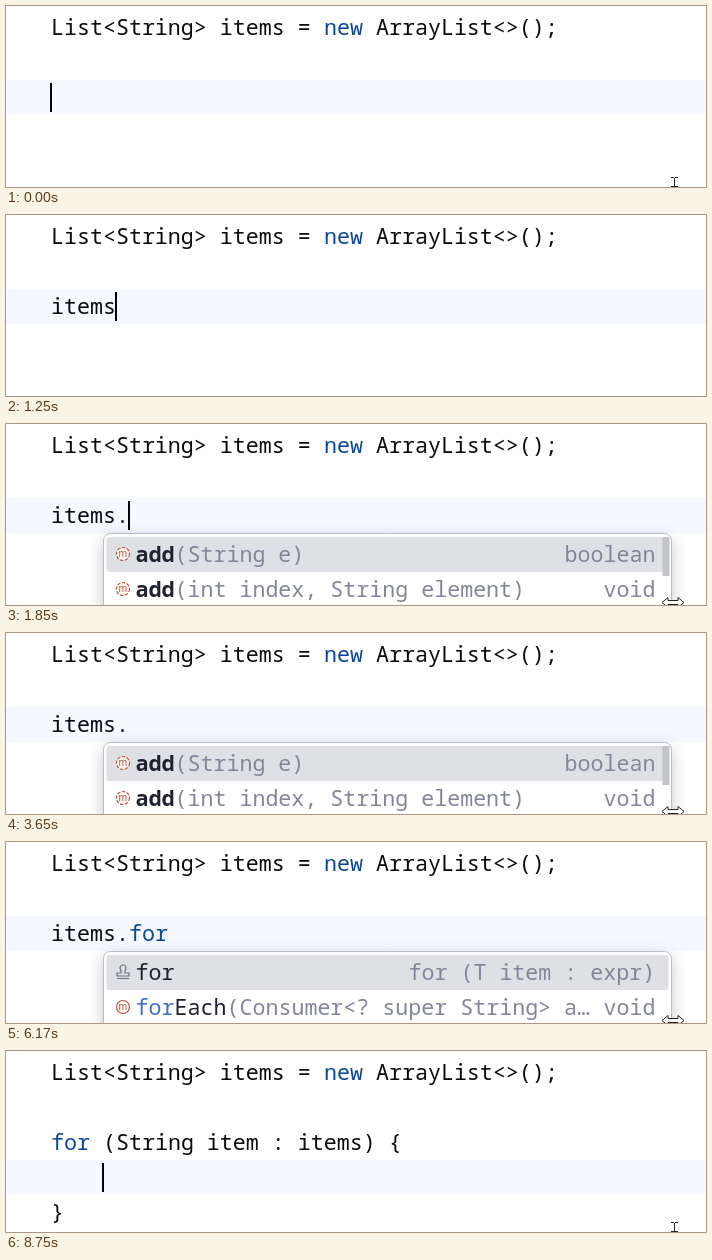
An HTML page with a canvas for the animation above (9080 ms loop, 700 by 181 pixels).

```html
<!DOCTYPE html>
<html lang="en">
<head>
<meta charset="utf-8">
<title>Code completion</title>
<style>
  html, body { margin: 0; width: 100%; height: 100%; overflow: hidden; background: #fff; }
  canvas { display: block; }
</style>
</head>
<body>
<canvas id="stage" width="700" height="181"></canvas>
<script>
const ctx = document.getElementById('stage').getContext('2d');
const LOOP = 9080, LEFT = 45, CHAR = 13, LINE = 35;
const INK = '#0b0b0d', KEYWORD = '#0b4796', DARK = '#1f2030', GREY = '#83869a', PREFIX = '#3c70cc';
const RED = '#b2573f', BROWN = '#9a6656';

const ink = text => [text, INK];
const keyword = text => [text, KEYWORD];
const dark = text => [text, DARK];
const grey = text => [text, GREY];
const bold = (text, color = DARK) => [text, color, true];

const DECLARATION = [ink('List<String> items = '), keyword('new'), ink(' ArrayList<>();')];
const LOOP_HEAD = [keyword('for'), ink(' (String item : items) {')];

const variablePopup = {
  x: 20, width: 568, textX: 52, selected: true, thumb: true,
  rows: [
    { icon: 'v', label: [['i', PREFIX], dark('tems')], type: 'List<String>' },
    { label: [bold('i', PREFIX), bold('f')] }
  ]
};
const methodPopup = {
  x: 97.5, width: 568, textX: 129.5, selected: true, thumb: true,
  rows: [
    { icon: 'abstract', label: [bold('add'), grey('(String e)')], type: 'boolean' },
    { icon: 'abstract', label: [bold('add'), grey('(int index, String element)')], type: 'void' }
  ]
};
const forPopup = typed => ({
  ...methodPopup, thumb: false,
  rows: [
    { icon: 'template', label: [dark('for')], type: 'for (T item : expr)' },
    {
      icon: 'm', type: 'void',
      label: [['for'.slice(0, typed), PREFIX], dark('forEach'.slice(typed)),
              grey('(Consumer<? super String> a…')]
    }
  ]
});
const namePopup = {
  x: 196.5, width: 273, textX: 207.5,
  rows: [{ label: [dark('item')] }, { label: [dark('s')] }]
};

// Each step changes only the listed properties.
const STEPS = [
  [0, { code: [], line: 2, column: 0, pointer: 'beam' }],
  [860, { code: [ink('i')], column: 1, pointer: null }],
  [920, { code: [ink('it')], column: 2, popup: variablePopup }],
  [1250, { code: [ink('items')], column: 5, popup: null }],
  [1580, { usages: true }],
  [1710, { code: [ink('items.')], column: 6, usages: false }],
  [1850, { popup: methodPopup, pointer: 'resize' }],
  [3720, { code: [ink('items.f')], column: 7 }],
  [3780, { code: [ink('items.fo')], column: 8, popup: forPopup(1) }],
  [3910, { code: [ink('items.for')], column: 9, popup: forPopup(2) }],
  [4380, { code: [ink('items.'), keyword('for')], popup: forPopup(3) }],
  [6630, { code: LOOP_HEAD, block: true, column: 16, selection: true, popup: null, pointer: 'beam' }],
  [6690, { popup: namePopup }],
  [8690, { popup: null, selection: false }],
  [8750, { line: 3, column: 4 }]
];
const CARET_OFF = [[130, 660], [2650, 3180], [3650, 3720], [5180, 5640], [6170, 6630], [7690, 8160]];

function fillRect(color, x, y, w, h) {
  ctx.fillStyle = color;
  ctx.fillRect(x, y, w, h);
}

function write(spans, x, baseline) {
  for (const [text, color, heavy] of spans) {
    ctx.font = `${heavy ? 'bold ' : ''}21.65px "Noto Sans Mono", monospace`;
    ctx.fillStyle = color;
    ctx.fillText(text, x, baseline);
    x += text.length * CHAR;
  }
}

const writeLine = (spans, line) => write(spans, LEFT, 29 + line * LINE);

function drawIcon(kind, x, y) {
  ctx.save();
  ctx.translate(x, y);
  ctx.lineWidth = 1.2;
  if (kind === 'template') {
    ctx.strokeStyle = '#6c707e';
    ctx.stroke(new Path2D('M-2 1C-1-1-3-2-3-4a3 3 0 0 1 6 0C3-2 1-1 2 1H6V4H-6V1ZM-6 6.5H6'));
  } else {
    const color = kind === 'v' ? BROWN : RED;
    ctx.strokeStyle = color;
    ctx.fillStyle = '#fff7f4';
    if (kind === 'abstract') ctx.setLineDash([3.2, 1.6]);
    ctx.beginPath();
    ctx.arc(0, 0, 6.5, 0, Math.PI * 2);
    ctx.fill();
    ctx.stroke();
    ctx.fillStyle = color;
    ctx.font = '10px Inter, sans-serif';
    ctx.textAlign = 'center';
    ctx.fillText(kind === 'v' ? 'v' : 'm', 0, 3);
  }
  ctx.restore();
}

function drawPopup({ x, width, textX, selected, thumb, rows }) {
  ctx.save();
  ctx.beginPath();
  ctx.roundRect(x, 109.5, width, 120, 7);
  ctx.shadowColor = 'rgba(40, 45, 65, .28)';
  ctx.shadowBlur = 16;
  ctx.shadowOffsetY = 5;
  ctx.fillStyle = '#fff';
  ctx.fill();
  ctx.shadowColor = 'transparent';
  ctx.strokeStyle = '#b9bdc9';
  ctx.stroke();
  ctx.restore();

  if (selected) {
    ctx.fillStyle = '#dfe0e4';
    ctx.beginPath();
    ctx.roundRect(x + 3, 113, width - 6, 35, 3);
    ctx.fill();
  }
  if (thumb) fillRect('#c3c4c8', x + width - 9, 113, 7, 39);

  rows.forEach(({ icon, label, type }, i) => {
    const baseline = 138 + i * LINE;
    if (icon) drawIcon(icon, textX - 12.5, baseline - 8);
    write(label, textX, baseline);
    if (type) write([grey(type)], x + width - 16 - type.length * CHAR, baseline);
  });
}

function drawPointer(kind) {
  if (kind === 'beam') {
    ctx.strokeStyle = '#222';
    ctx.lineWidth = 1;
    ctx.stroke(new Path2D('M665 171.5H668M669 171.5H672M668.5 172V181M665 180.5H672'));
  } else if (kind === 'resize') {
    const arrow = new Path2D('M656 178.5L662 173.5V176.5H672V173.5L678 178.5L672 183.5V180.5H662V183.5Z');
    ctx.fillStyle = '#fff';
    ctx.strokeStyle = '#222';
    ctx.lineWidth = 1;
    ctx.fill(arrow);
    ctx.stroke(arrow);
  }
}

function draw(time) {
  const state = Object.assign({}, ...STEPS.filter(([start]) => start <= time).map(step => step[1]));
  const lineTop = 4 + state.line * LINE;

  fillRect('#fff', 0, 0, 700, 181);
  fillRect('#f5f8fe', 0, lineTop, 700, LINE);
  if (state.usages) {
    fillRect('#fce8f4', 214, 4, 65, LINE);
    fillRect('#edebfc', 45, 74, 65, LINE);
  }
  if (state.selection) {
    fillRect('#a6d2ff', 201, 74, 53, LINE);
    ctx.strokeStyle = '#2868d8';
    ctx.lineWidth = 1;
    ctx.strokeRect(200.5, 74.5, 53, LINE - 1);
  }

  writeLine(DECLARATION, 0);
  writeLine(state.code, 2);
  if (state.block) writeLine([ink('}')], 4);

  if (!CARET_OFF.some(([from, to]) => time >= from && time < to)) {
    fillRect('#000', 44 + state.column * CHAR, lineTop + 3, 2, 29);
  }
  if (state.popup) drawPopup(state.popup);
  drawPointer(state.pointer);
}

const begin = performance.now();
function tick() {
  draw((performance.now() - begin) % LOOP);
  requestAnimationFrame(tick);
}
tick();
</script>
</body>
</html>
```
